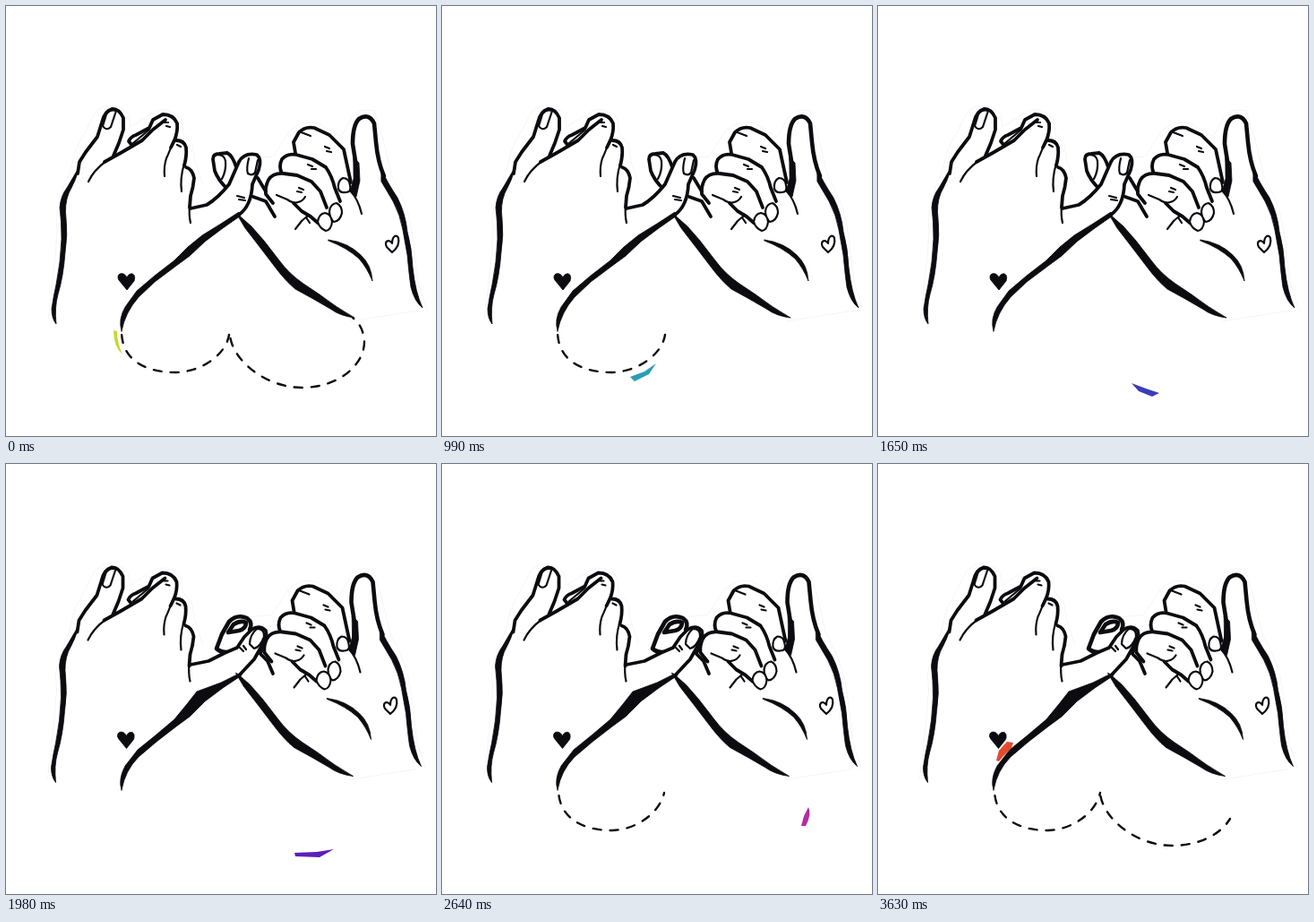
Recreate the animation shown at these times as an HTML page. Size 480 by 480 pixels, loop 3.96 s.

```html
<!DOCTYPE html>
<html lang="en">
<head>
<meta charset="utf-8">
<title>Pinky promise</title>
<style>
  html, body { margin: 0; width: 100%; height: 100%; overflow: hidden; background: #fff; }
  svg { display: block; width: 100%; height: 100%; }
  path { fill: none; stroke: #0b0b10; stroke-width: 3.8; stroke-linecap: round; stroke-linejoin: round; }
  .thin { stroke-width: 2.2; }
  .bold { stroke-width: 4.6; }
  .skin { fill: #fff; }
  .ink { fill: #0b0b10; stroke-width: .8; }
  .edge { stroke: #f5f5f5; stroke-width: 1; }
  .lobe { stroke-width: 2.4; stroke-dasharray: 9 10; stroke-dashoffset: -4; }

  .open, .hooked, .left, .right, .mark { animation: 3960ms step-end infinite; }
  .open { animation-name: open; }
  .hooked { animation-name: hooked; }
  .left { animation-name: left; }
  .right { animation-name: right; }
  .mark { animation-name: mark; animation-delay: calc((var(--i) - 12) * 330ms); stroke: none; fill: var(--c); }

  @keyframes open {
    0%, 25%, 41.66%, 58.33%, 75% { opacity: 1; }
    16.66%, 33.33%, 50%, 66.66%, 91.66% { opacity: 0; }
  }
  @keyframes hooked {
    0%, 25%, 41.66%, 58.33%, 75% { opacity: 0; }
    16.66%, 33.33%, 50%, 66.66%, 91.66% { opacity: 1; }
  }
  @keyframes left { 0%, 58.33% { visibility: visible; } 41.66% { visibility: hidden; } }
  @keyframes right { 0%, 75% { visibility: visible; } 25% { visibility: hidden; } }
  @keyframes mark { 0% { opacity: 1; } 8.33%, 100% { opacity: 0; } }
</style>
</head>
<body>
<svg viewBox="0 0 480 480">
  <defs>
    <g id="leftHand">
      <path class="edge" d="M47 350Q55 290 57 250Q52 225 71 187L78 160L100 118Q119 102 137 121L139 135L164 119Q181 109 196 126L198 143L208 154L211 174L220 200"/>
      <!-- index finger and wrist -->
      <path d="M120 167L126 153L131 138L131 125Q126 114 118 115Q110 117 107 130L102 146L89 163L82 174L80 187"/>
      <path class="ink" d="M82 180Q78 195 70 209Q65 222 67 237Q69 255 66 275Q64 302 58 322Q54 336 56 355Q51 349 51 338Q53 324 56 311Q61 286 62 260Q62 240 60 225Q61 212 68 203L78 186Z"/>
      <path class="thin" d="M108 134L112 121Q116 115 123 117L117 135Q112 140 108 134Z"/>
      <!-- folded fingers -->
      <path class="thin" d="M92 196Q98 183 112 173"/>
      <path d="M110 174L128 164L152 150L164 138L178 127"/>
      <path d="M141 156L137 151Q139 146 145 144L160 136L164 127L175 121Q187 121 191 131Q192 140 188 150L184 158"/>
      <path class="thin" d="M142 153L160 138M187 150Q182 164 179 170Q176 179 177 190"/>
      <path class="thin" d="M177 130L181 130M179 134L183 135M191 155L195 157"/>
      <path d="M190 150Q199 150 201 158Q202 167 199 178"/>
      <path class="thin" d="M199 176Q194 192 196 207"/>
      <path d="M201 180Q208 182 210 192Q209 203 206 212L205 225"/>
      <path class="thin" d="M205 221Q204 234 206 242"/>
      <path class="ink" d="M135 303C131 295 122 299 126 306L135 317L143 307C146 298 138 296 135 303Z"/>
    </g>
    <g id="rightHand">
      <path class="edge" d="M276 170L298 168L316 140Q331 126 349 131L374 146L382 132Q390 112 411 117L421 149L430 188Q450 223 454 257L460 308L470 340M384 352L460 340"/>
      <!-- index -->
      <path class="skin" d="M323 164L321 152L327 141Q334 134 344 136L361 144L377 160L383 188L385 197"/>
      <path class="thin" d="M327 140L340 145M356 157L361 159M358 162L363 163"/>
      <path class="thin skin" d="M371 204Q370 195 376 192Q383 192 384 200Q386 208 379 208Q373 209 371 204Z"/>
      <!-- middle -->
      <path class="skin" d="M308 187Q304 179 308 171Q314 164 324 166L342 171L357 180Q364 190 367 203L373 218"/>
      <path class="thin" d="M337 177L342 179M341 182L346 182"/>
      <path class="thin skin" d="M361 229Q362 221 369 220Q375 223 375 231Q373 240 366 241Q361 237 361 229Z"/>
      <!-- ring and palm edge -->
      <path class="skin" d="M298 220L290 210Q289 202 293 194Q298 186 310 187L325 189L341 196L351 207L358 225"/>
      <path d="M321 220L330 229L340 235L348 242"/>
      <path class="thin" d="M302 211L314 216Q321 221 326 219Q331 218 334 213M327 203L332 205M325 207L330 208M335 236L339 242"/>
      <path d="M337 234L330 240L323 249" class="thin"/>
      <path class="thin skin" d="M348 241Q349 232 356 231Q363 232 364 241Q363 250 357 251Q350 248 348 241Z"/>
      <!-- thumb and wrist -->
      <path class="bold" d="M390 200L391 179L387 154Q387 133 394 126Q405 119 411 131L413 152Q415 174 422 190"/>
      <path class="ink" d="M388 170L394 175L395 195L391 213L384 207L388 193Z"/>
      <path class="thin" d="M384 206Q393 215 397 232"/>
      <path class="ink" d="M419 182Q425 196 437 214Q446 232 448 252Q453 270 454 292Q457 320 465 337Q456 330 452 314Q450 300 448 278L443 250Q440 233 432 218L419 196Z"/>
      <path class="ink" d="M360 261Q382 264 396 278Q408 289 409 307Q403 292 394 282Q381 270 360 262Z"/>
      <path class="ink" d="M257 231L274 246L288 262L305 284Q316 299 332 310L350 322Q368 336 389 348Q373 346 362 338L343 327L323 316Q312 307 300 291L284 270L267 248Z"/>
    </g>
    <path id="smallHeart" class="thin" d="M431 265C427 259 422 263 425 269L431 275Q440 268 438 259C436 254 431 257 431 265Z"/>
  </defs>

  <g class="open">
    <use href="#leftHand"/><use href="#rightHand"/><use href="#smallHeart"/>
    <path class="skin" d="M248 205Q237 195 233 184L231 171Q231 165 238 165L247 164Q253 167 257 180"/>
    <path class="thin" d="M236 166Q244 166 245 173Q246 184 241 193"/>
    <path class="skin" d="M206 226L224 222Q236 215 249 199L260 174Q266 163 280 166Q286 171 282 183L275 199Q274 223 260 233"/>
    <path class="thin" d="M271 170Q268 182 270 187Q275 190 278 186L281 172M258 212L266 214M260 216L267 217"/>
    <path class="ink" d="M129 363Q125 350 133 336L146 318L166 301L188 284L203 269L219 256L240 243L260 230L262 234L242 248L222 263L205 279L190 290L166 308L148 325Q133 342 129 363Z"/>
    <path d="M281 192L290 207M276 213L290 218L300 235"/>
    <path class="lobe left" d="M129 363C129 395 155 409 190 409C220 408 246 388 249 367"/>
    <path class="lobe right" d="M250 367C252 395 290 426 330 426C372 426 400 400 400 375Q399 357 387 348"/>
  </g>

  <g class="hooked">
    <use href="#leftHand" x="-.5" y=".5"/><use href="#rightHand" x="-1.5" y=".5"/><use href="#smallHeart" x="-2" y="4"/>
    <path class="skin bold" d="M272 185Q276 177 269 172Q258 167 249 176L241 190L235 206Q240 211 250 210"/>
    <path class="skin" d="M206 224L226 220L244 211L258 205L266 193L274 185Q283 179 290 186Q292 194 286 202L277 218L262 234"/>
    <path class="bold" d="M248 188L254 179Q262 174 268 177Q268 184 260 186Z"/>
    <path class="thin" d="M272 201Q272 191 280 184Q289 184 288 193Q284 204 277 206ZM261 205L265 209M265 203L268 207"/>
    <path class="ink" d="M129 364Q125 352 133 337L147 319L168 302L188 285L202 268L213 254L240 244L262 233L263 236L242 250L222 265L205 282L190 293L168 310L148 327Q133 342 129 364Z"/>
    <path d="M287 203L284 212L292 220L298 234"/>
    <path class="lobe left" d="M130 366C132 396 157 409 190 409C218 408 243 389 248 367"/>
    <path class="lobe right" d="M248 367C250 395 288 426 328 426C358 426 382 414 393 396"/>
  </g>

  <!-- coloured dash travelling around the heart -->
  <path class="mark" style="--i:0;--c:#c6d92f" d="M120 362L124 363Q124 376 130 389Q120 380 120 362Z"/>
  <path class="mark" style="--i:1;--c:#6cc350" d="M135 395L148 405L159 411L153 413L141 406Z"/>
  <path class="mark" style="--i:2;--c:#35bb8d" d="M163 417L197 416L186 422L170 422Z"/>
  <path class="mark" style="--i:3;--c:#2b9fb4" d="M210 414L226 408L239 399L231 411L215 419Z"/>
  <path class="mark" style="--i:4;--c:#2864b8" d="M250 389L254 391L263 404L275 417L260 408L252 398Z"/>
  <path class="mark" style="--i:5;--c:#3a3db8" d="M283 421L299 427L314 432L306 436L291 430Z"/>
  <path class="mark" style="--i:6;--c:#5c20b8" d="M322 434L347 433L366 430L350 439L323 438Z"/>
  <path class="mark" style="--i:7;--c:#8a27b8" d="M371 426L383 419L394 410L390 420L377 430Z"/>
  <path class="mark" style="--i:8;--c:#b42ba8" d="M409 383Q413 391 406 404L401 404L404 393Z"/>
  <path class="mark" style="--i:9;--c:#c4213c" d="M401 353Q414 352 411 378Q403 371 401 353Z"/>
  <path class="mark" style="--i:10;--c:#d63535" d="M386 337L394 337L404 346L406 350L396 348Z"/>
  <path class="mark" style="--i:11;--c:#e34a2e" d="M132 331L135 320L144 310L151 311L149 317L140 326L135 332Z"/>
</svg>
</body>
</html>
```
